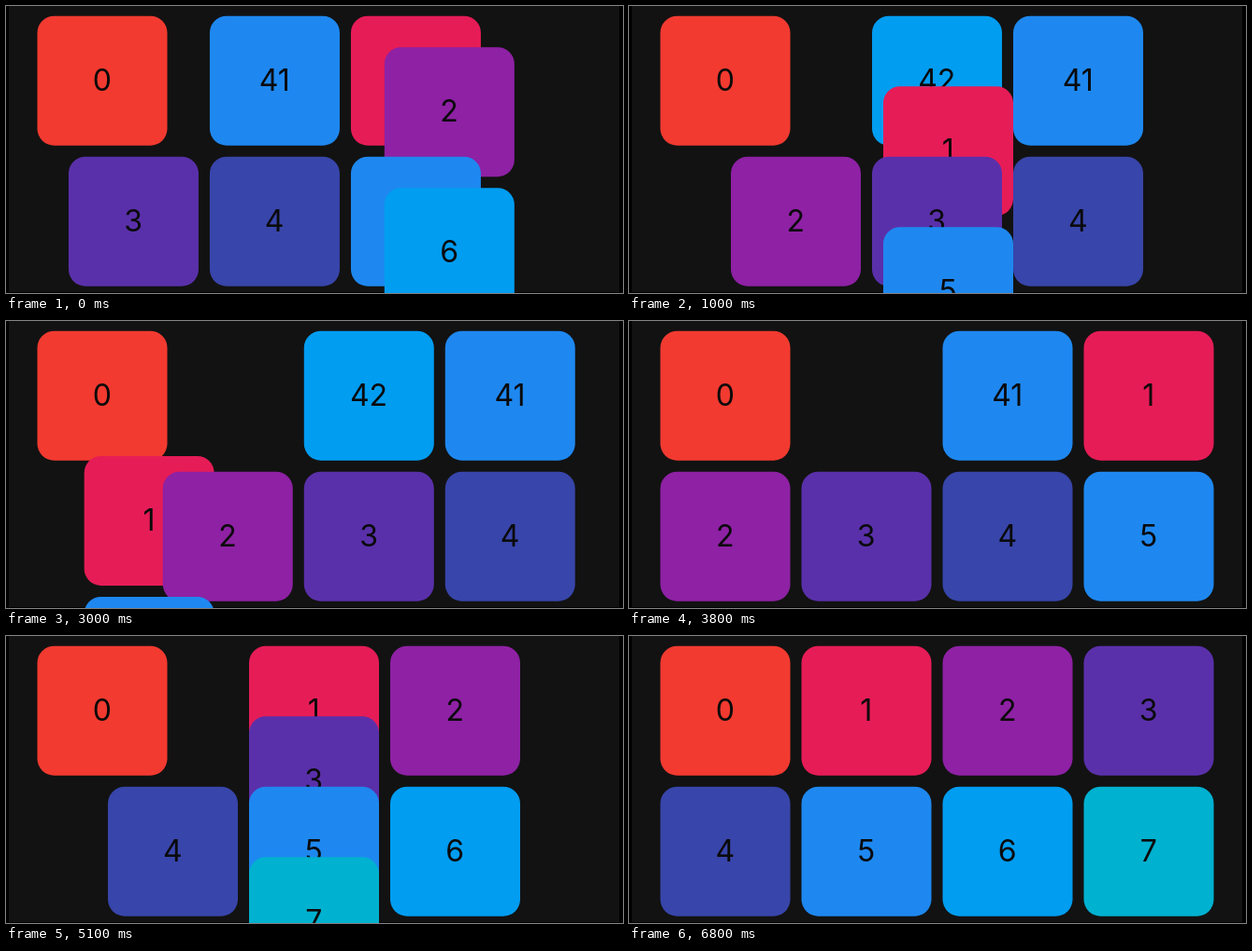
Recreate the animation shown at these times as an HTML page. Size 660 by 308 pixels, loop 6900 ms.

```html
<!DOCTYPE html>
<html lang="en">
<head>
<meta charset="utf-8">
<title>Grid insert and remove</title>
<style>
  html, body { margin: 0; width: 100%; height: 100%; overflow: hidden; background: #000; }
  #stage { position: relative; width: 660px; height: 308px; overflow: hidden; background: #000; }
  #panel { position: absolute; left: 3px; top: 0; width: 652.5px; height: 307px; background: #121212; }
  .tile {
    position: absolute; left: 0; top: 0; width: 138.5px; height: 138.5px;
    border-radius: 18px; color: #0a0a0a;
    font: 400 32px/138.5px Inter, Roboto, sans-serif; text-align: center;
  }
</style>
</head>
<body>
<div id="stage"><div id="panel"></div></div>
<script>
const LOOP = 6900, TICK = 100, MOVE = 250, FADE = 120;
const LEFT = 33.5, TOP = 10.7, PITCH = 151, COLS = 4;
const LAST_X = LEFT + PITCH * (COLS - 1);
const WRAP_X = LAST_X + 24; // rows wrapping downwards set off from here
const COLORS = ['#f23a30', '#e61c57', '#8e21a4', '#5a30aa', '#3845aa', '#1e88f0', '#009df1', '#00b1d0'];

// Number of extra tiles in slot 1 onwards, before and after each change
const steps = [
  { at: -78, from: 1, to: 2 },
  { at: 875, from: 2, to: 3 },
  { at: 2946, from: 3, to: 2 },
  { at: 3800, from: 2, to: 1 },
  { at: 4975, from: 1, to: 0 }
];

const clamp = v => Math.max(0, Math.min(1, v));
const ease = v => (1 - Math.cos(Math.PI * clamp(v))) / 2;
const lerp = (a, b, p) => a + (b - a) * p;
const slot = i => ({ x: LEFT + PITCH * (i % COLS), y: TOP + PITCH * Math.floor(i / COLS) });

function addTile(label, color, rank, born = -Infinity, gone = Infinity) {
  const el = document.createElement('div');
  el.className = 'tile';
  el.textContent = label;
  el.style.background = color;
  document.getElementById('stage').append(el);
  return { el, rank, born, gone };
}

const tiles = [];
addTile(0, COLORS[0], 0).el.style.transform = `translate(${LEFT}px, ${TOP}px)`;
tiles.push(addTile(43, COLORS[7], -2, 875 + MOVE, 2946));
tiles.push(addTile(42, COLORS[6], -1, -78 + MOVE, 3800));
tiles.push(addTile(41, COLORS[5], 0, -Infinity, 4975));
for (let i = 1; i < 8; i++) tiles.push(addTile(i, COLORS[i], i));

function place(tile, step, p) {
  const i = Math.max(1, step.from + tile.rank);
  const j = Math.max(1, step.to + tile.rank);
  const a = slot(i), b = slot(j);
  const wrapsDown = b.y > a.y;
  const x = wrapsDown ? Math.min(LAST_X, lerp(WRAP_X, b.x, p)) : lerp(a.x, b.x, p);
  tile.el.style.transform = `translate(${x}px, ${lerp(a.y, b.y, p)}px)`;
}

function draw() {
  const t = Math.floor((performance.now() % LOOP) / TICK) * TICK;
  const step = steps.filter(s => s.at <= t).pop();
  const p = ease((t - step.at) / MOVE);
  for (const tile of tiles) {
    place(tile, step, p);
    tile.el.style.opacity = clamp(Math.min(t - tile.born, tile.gone - t) / FADE);
  }
  requestAnimationFrame(draw);
}
draw();
</script>
</body>
</html>
```
